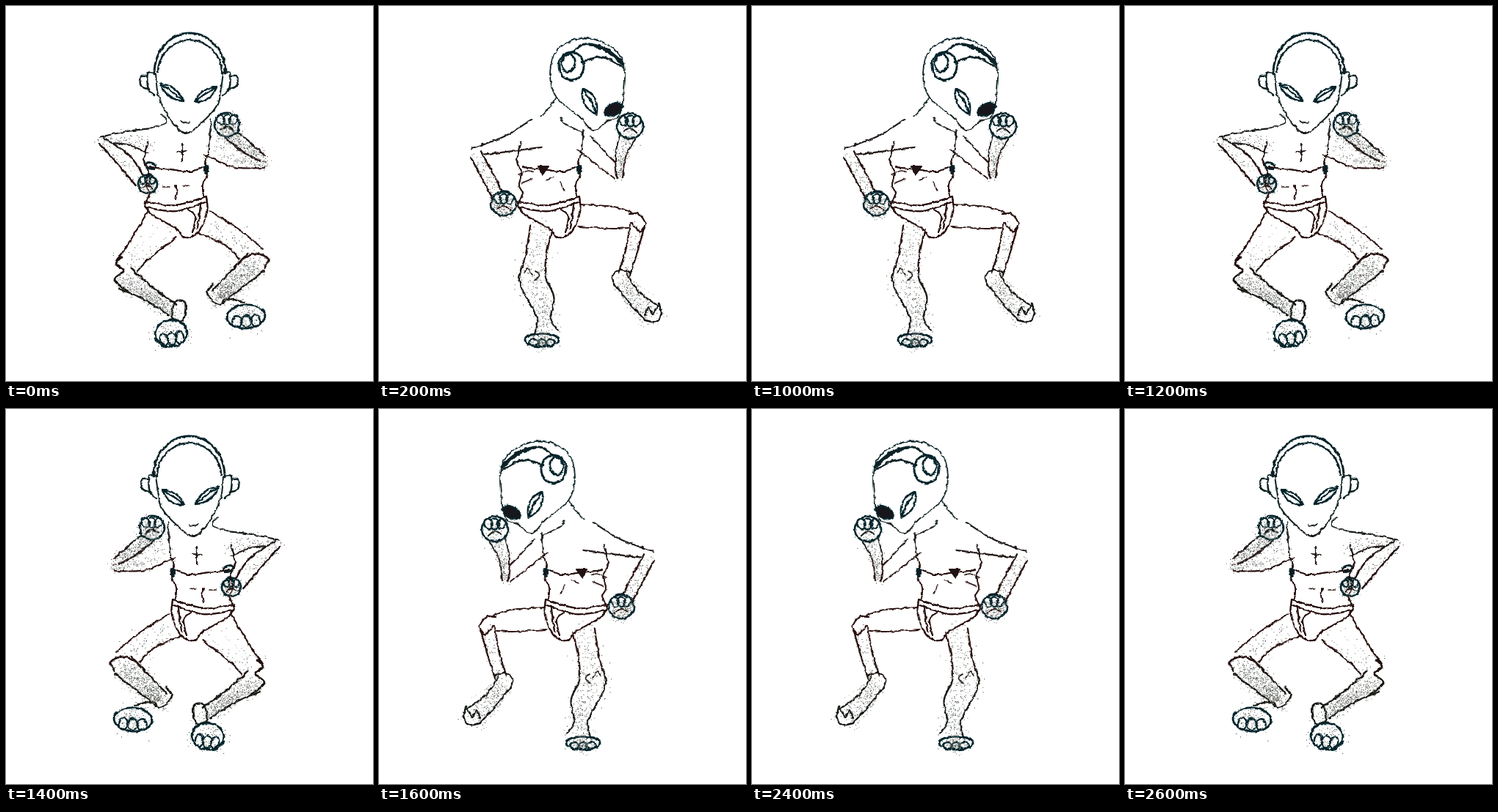
Write an HTML page that moves like this. It is 500 px wide and 512 px high and loops after 2800 ms.

```html
<!DOCTYPE html>
<html lang="en">
<head>
<meta charset="utf-8">
<title>Dancing alien</title>
<style>
  html, body { margin: 0; width: 100%; height: 100%; overflow: hidden; background: #fff; }
  svg { display: block; width: 500px; height: 512px; }
  path, ellipse { fill: none; stroke: url(#ink); stroke-linecap: round; stroke-linejoin: round; }
  .blank { fill: #fff; stroke: none; }
  .solid { fill: #17191a; }
</style>
</head>
<body>
<svg viewBox="0 0 500 512">
  <defs>
    <linearGradient id="ink" gradientUnits="userSpaceOnUse" x1="0" y1="40" x2="0" y2="470">
      <stop offset="0" stop-color="#06242a"/>
      <stop offset=".25" stop-color="#10201f"/>
      <stop offset=".4" stop-color="#26110f"/>
      <stop offset=".65" stop-color="#2a0f0b"/>
      <stop offset=".8" stop-color="#151310"/>
      <stop offset="1" stop-color="#06100f"/>
    </linearGradient>
    <filter id="rough" filterUnits="userSpaceOnUse" x="0" y="0" width="500" height="512">
      <feTurbulence type="fractalNoise" baseFrequency=".16" numOctaves="2" seed="4"/>
      <feDisplacementMap in="SourceGraphic" scale="4" xChannelSelector="R" yChannelSelector="G"/>
    </filter>
  </defs>
  <g id="stage"></g>
</svg>
<script>
let ink = '', dust = '', seed = 7;
const random = () => (seed = seed * 16807 % 2147483647) / 2147483647;
const group = (list, size) =>
  Array.from({ length: list.length / size }, (_, i) => list.slice(i * size, i * size + size));

// Smooth curve through points
function spline(points, closed) {
  const n = points.length;
  const at = i => points[closed ? (i + n) % n : Math.max(0, Math.min(n - 1, i))];
  let d = `M${points[0]}`;
  for (let i = 0; i < (closed ? n : n - 1); i++) {
    const [a, b, c, e] = [at(i - 1), at(i), at(i + 1), at(i + 2)];
    d += `C${[0, 1].map(k => b[k] + (c[k] - a[k]) / 6)} ${[0, 1].map(k => c[k] - (e[k] - b[k]) / 6)} ${c}`;
  }
  return d;
}
const path = (w, d, kind = '') => ink += `<path class="${kind}" d="${d}" stroke-width="${w}"/>`;
const line = (w, ...xy) => path(w, spline(group(xy, 2)));
const loop = (w, ...xy) => path(w, spline(group(xy, 2), true));
const oval = (w, x, y, rx, ry, deg = 0, kind = '') =>
  ink += `<ellipse class="${kind}" rx="${rx}" ry="${ry}" stroke-width="${w}" transform="translate(${x} ${y}) rotate(${deg})"/>`;

function cloud(x, y, spread, count) {
  const off = () => (random() + random() + random() - 1.5) * spread * 1.3;
  for (let i = 0; i < count; i++) {
    const tint = ['#222c28', '#77706a', '#a9b3ab'][i % 3];
    dust += `<path d="M${(x + off()).toFixed(1)} ${(y + off()).toFixed(1)}h1" style="stroke:${tint};stroke-linecap:butt"/>`;
  }
}

// Limb through joints given as x, y, half width
function limb(w, shade, ...xyr) {
  const joints = group(xyr, 3);
  const edge = side => joints.map(([x, y, r], i) => {
    const [ax, ay] = joints[Math.max(0, i - 1)];
    const [bx, by] = joints[Math.min(joints.length - 1, i + 1)];
    const k = side * r / Math.hypot(bx - ax, by - ay);
    return [x - (by - ay) * k, y + (bx - ax) * k];
  });
  const left = edge(1), right = edge(-1);
  path(0, spline([...left, ...right.slice().reverse()], true), 'blank');
  path(w, spline(left) + spline(right));
  for (let i = 1; i < joints.length && shade; i++) {
    const [[ax, ay], [bx, by, r]] = [joints[i - 1], joints[i]];
    for (let t = 0; t < 1; t += .1) cloud(ax + (bx - ax) * t, ay + (by - ay) * t + r / 3, r, shade);
  }
}

function eye(x, y, len, wide, deg) {
  ink += `<g transform="translate(${x} ${y}) rotate(${deg})">`;
  path(2.5, `M${-len} 0Q0 ${-2 * wide} ${len} 0Q0 ${2 * wide} ${-len} 0Q0 ${-wide / 3} ${len} 0`);
  ink += '</g>';
}

function fist(x, y, r, shade) {
  oval(2.7, x, y, r, r * .95, 0, 'solid" style="fill:#fff');
  for (const i of [-1, 0, 1]) oval(2.2, x + i * r * .5, y - r * .4, r * .3, r * .4, i * 20);
  line(2.2, x - r * .5, y + r * .4, x, y + r * .15, x + r * .5, y + r * .5);
  cloud(x, y + r / 3, r * .8, shade);
}

function foot(x, y, rx, ry, deg) {
  oval(2.9, x, y, rx, ry, deg);
  const c = Math.cos(deg * Math.PI / 180), s = Math.sin(deg * Math.PI / 180);
  for (const i of [-.5, 0, .5]) {
    oval(2.5, x + i * rx * c - ry * .4 * s, y + i * rx * s + ry * .4 * c, rx * .24, ry * .5, deg);
  }
  cloud(x, y, ry, 130);
}

function trunk() {
  line(1.8, 194, 185, 188, 212, 194, 226, 191, 245, 196, 256, 190, 267);
  line(1.6, 278, 170, 277, 194, 272, 214, 274, 230, 268, 244, 269, 260);
  line(1.8, 196, 220, 224, 223, 250, 226, 272, 219);
  line(2, 190, 267, 230, 272, 273, 260);
  line(2, 191, 275, 232, 280, 274, 267);
  line(2, 189, 267, 196, 283, 230, 303, 244, 316, 262, 309, 274, 282, 273, 260);
  line(2.2, 247, 277, 258, 287, 254, 310);
  line(2, 265, 272, 261, 304);
  oval(2, 273, 223, 3, 5, 0, 'solid');
}

function front() {
  line(2, 204, 92, 207, 120, 219, 147, 237, 170, 249, 173, 268, 158, 288, 134, 296, 92);
  path(3, 'M202 93A48 55 0 0 1 299 92');
  path(2.5, 'M207 90A43 44 0 0 1 294 92');
  for (const side of [-1, 1]) {
    line(2.5, 249 + side * 47, 91, 249 + side * 56, 92, 249 + side * 55, 113, 249 + side * 46, 122);
    line(2.5, 249 + side * 57, 95, 249 + side * 66, 96, 249 + side * 65, 109, 249 + side * 56, 113);
  }
  eye(226, 118, 20, 6, 37);
  eye(272, 121, 18, 6, -34);
  line(1.8, 238, 157, 244, 160, 251, 158);
  limb(2.2, 4, 195, 184, 17, 165, 180, 9, 128, 183, 4);
  limb(2.6, 3, 130, 184, 5, 161, 211, 10, 183, 240, 8);
  limb(2, 6, 280, 187, 19, 315, 209, 12, 353, 217, 4);
  limb(2.3, 14, 349, 208, 5, 325, 190, 8, 302, 172, 8);
  trunk();
  line(1.7, 212, 148, 219, 159, 196, 167);
  line(1.7, 277, 155, 280, 163, 278, 174);
  line(2.2, 240, 188, 240, 212);
  line(2, 234, 199, 246, 198);
  line(2, 231, 245, 233, 254, 231, 264);
  line(1.6, 213, 247, 222, 247);
  line(1.6, 241, 246, 250, 245);
  oval(3, 197, 218, 7, 4, 20);
  fist(193, 243, 13, 110);
  fist(301, 162, 17, 170);
  limb(2.2, 3, 212, 299, 26, 183, 332, 18, 163, 357, 15);
  limb(2.6, 24, 162, 372, 16, 195, 393, 10, 227, 415, 9);
  limb(2.3, 4, 270, 295, 17, 310, 317, 14, 338, 344, 17);
  limb(2.5, 32, 340, 350, 16, 308, 379, 13, 288, 396, 10);
  trunk();
  line(3, 158, 342, 150, 352, 160, 362, 148, 374, 166, 390);
  line(2.8, 322, 346, 340, 338, 357, 345, 352, 358);
  line(2.4, 282, 380, 274, 392, 290, 408, 304, 400, 325, 405);
  loop(2.5, 231, 404, 244, 405, 241, 429, 226, 426);
  foot(225, 447, 22, 18, -8);
  foot(327, 424, 26, 16, -4);
}

function sideUpper() {
  loop(1.8, 334, 80, 310, 52, 275, 44, 243, 60, 233, 92, 242, 125, 272, 150, 292, 170, 312, 156, 329, 145);
  line(3, 262, 64, 281, 52, 310, 59, 334, 79);
  line(3, 277, 76, 305, 70, 333, 84);
  line(3.5, 290, 53, 312, 62, 332, 80);
  oval(3, 262, 82, 17, 19);
  oval(2.8, 258, 78, 9, 12, 15);
  eye(287, 130, 20, 8, 62);
  oval(2, 320, 141, 13, 8, -30, 'solid');
  limb(2.2, 0, 214, 174, 20, 175, 188, 11, 128, 199, 5);
  limb(2.3, 4, 132, 203, 8, 150, 236, 8, 163, 262, 8);
  limb(1.8, 0, 280, 187, 13, 305, 211, 10, 326, 229, 8);
  limb(2, 7, 339, 178, 11, 329, 205, 7, 328, 234, 4);
  trunk();
  line(1.8, 241, 124, 233, 138, 221, 151);
  line(1.6, 247, 152, 254, 161, 278, 173);
  path(2, 'M217 219H231L223 230Z', 'solid');
  line(1.6, 190, 230, 203, 225, 210, 227);
  line(1.6, 194, 242, 208, 236);
  line(1.5, 228, 238, 238, 234);
  line(1.5, 247, 240, 252, 252);
  fist(170, 270, 17, 180);
  fist(342, 164, 18, 60);
}

function sideStand() {
  limb(2.3, 7, 221, 302, 15, 214, 340, 14, 209, 372, 18, 222, 402, 17, 225, 428, 9, 228, 446, 17);
  line(1.8, 198, 364, 203, 358, 208, 368);
  line(1.8, 213, 362, 219, 367, 212, 375);
  foot(222, 456, 23, 9, 0);
}

function liftedLeg() {
  limb(1.9, 0, 273, 286, 15, 318, 289, 15, 350, 293, 9);
  limb(2.2, 2, 352, 298, 10, 344, 335, 8, 334, 366, 8);
  limb(2.4, 12, 329, 373, 11, 348, 398, 10, 370, 418, 13);
  line(2.2, 340, 283, 354, 284, 363, 298, 356, 308, 344, 296);
  line(2.4, 341, 364, 328, 360, 318, 369, 322, 382);
  line(2.6, 362, 429, 378, 431, 385, 420, 381, 406);
  line(2.4, 362, 422, 367, 412, 373, 420, 379, 410);
}

function kickLeg() {
  limb(2.4, 0, 263, 308, 14, 309, 283, 12, 342, 256, 9, 390, 222, 9, 418, 202, 6, 440, 181, 5);
  line(2, 328, 256, 338, 245, 349, 260, 340, 268);
  line(2.4, 426, 202, 420, 218, 411, 224, 404, 213);
  oval(3, 440, 181, 6, 4, -40, 'solid');
}

function kick() {
  loop(2, 228, 76, 268, 60, 312, 72, 333, 112, 312, 150, 275, 164, 235, 163, 203, 150, 208, 118);
  line(2.4, 303, 66, 324, 102, 305, 132);
  line(2.8, 312, 72, 332, 110, 308, 144);
  oval(2.8, 287, 141, 18, 15, -25);
  oval(2.6, 289, 146, 10, 8, -15);
  eye(253, 119, 20, 8, -2);
  oval(2, 227, 93, 14, 6, -60, 'solid');
  oval(2, 211, 135, 3, 4, 0, 'solid');
  line(2, 243, 165, 240, 175, 247, 182, 243, 190);
  line(2, 268, 165, 273, 184, 268, 205, 258, 234, 240, 248, 242, 288);
  for (let i = 0; i < 4; i++) {
    line(7 - i, 201 + i * 8, 181 + i * 5, 176 + i * 6, 209 + i * 6, 146 + i * 8, 243 + i);
    line(1.8, 162 + i * 4, 254 + i * 10, 180 + i * 4, 258 + i * 10, 198 + i * 3, 254 + i * 10);
  }
  line(3, 199, 179, 226, 187, 222, 205, 203, 240);
  line(2.2, 226, 183, 235, 187, 246, 181);
  line(2, 158, 247, 153, 262, 163, 279, 180, 292);
  oval(3, 210, 242, 7, 6, 0, 'solid');
  oval(3, 258, 233, 4, 5, 0, 'solid');
  line(2, 200, 256, 206, 266, 208, 288);
  line(4, 213, 262, 216, 272, 214, 282);
  line(2, 225, 256, 231, 265, 229, 284);
  limb(2.2, 0, 273, 207, 11, 315, 207, 6, 351, 208, 7);
  limb(2.2, 0, 348, 158, 7, 347, 182, 6, 348, 208, 7);
  line(2, 340, 158, 355, 158);
  fist(351, 143, 15, 0);
  kickLeg();
  line(2.4, 188, 310, 178, 333, 145, 358, 126, 372, 130, 382);
  line(2.8, 224, 328, 206, 347, 190, 360, 186, 379);
  limb(2.5, 0, 140, 379, 8, 184, 393, 12, 222, 412, 8, 258, 421, 9);
  line(2.8, 268, 414, 277, 432, 250, 440, 225, 456, 200, 458, 202, 446, 238, 438, 247, 424);
  line(2.5, 178, 296, 205, 298, 235, 294, 258, 287);
  line(2.4, 180, 303, 205, 307, 238, 304, 262, 294);
  line(2.8, 178, 296, 190, 313, 225, 328, 250, 332, 264, 312, 258, 287);
  for (const x of [222, 240, 252]) line(3, x, 298, x + 6, 311, x - 1, 328);
  cloud(160, 235, 30, 420);
  cloud(220, 95, 24, 380);
  cloud(145, 375, 26, 300);
  cloud(190, 275, 34, 320);
  cloud(200, 335, 20, 130);
}

function step() { sideUpper(); liftedLeg(); sideStand(); trunk(); }
function swing() {
  sideUpper();
  ink += '<g transform="translate(8 -22) rotate(10 262 308)">';
  kickLeg();
  ink += '</g>';
  sideStand();
  trunk();
}

const stage = document.getElementById('stage');
for (const pose of [front, step, swing, kick]) {
  ink = dust = '';
  pose();
  stage.innerHTML += `<g id="${pose.name}"><g filter="url(#rough)">${ink}</g>${dust}</g>`;
}
const dance = ['front', 'step', 'swing', 'kick', 'swing', 'step', 'front'];

function show() {
  const beat = Math.floor(performance.now() / 200) % 14;
  for (const g of stage.children) g.style.display = g.id === dance[beat % 7] ? '' : 'none';
  stage.setAttribute('transform', beat < 7 ? '' : 'matrix(-1 0 0 1 500 0)');
  requestAnimationFrame(show);
}
show();
</script>
</body>
</html>
```
